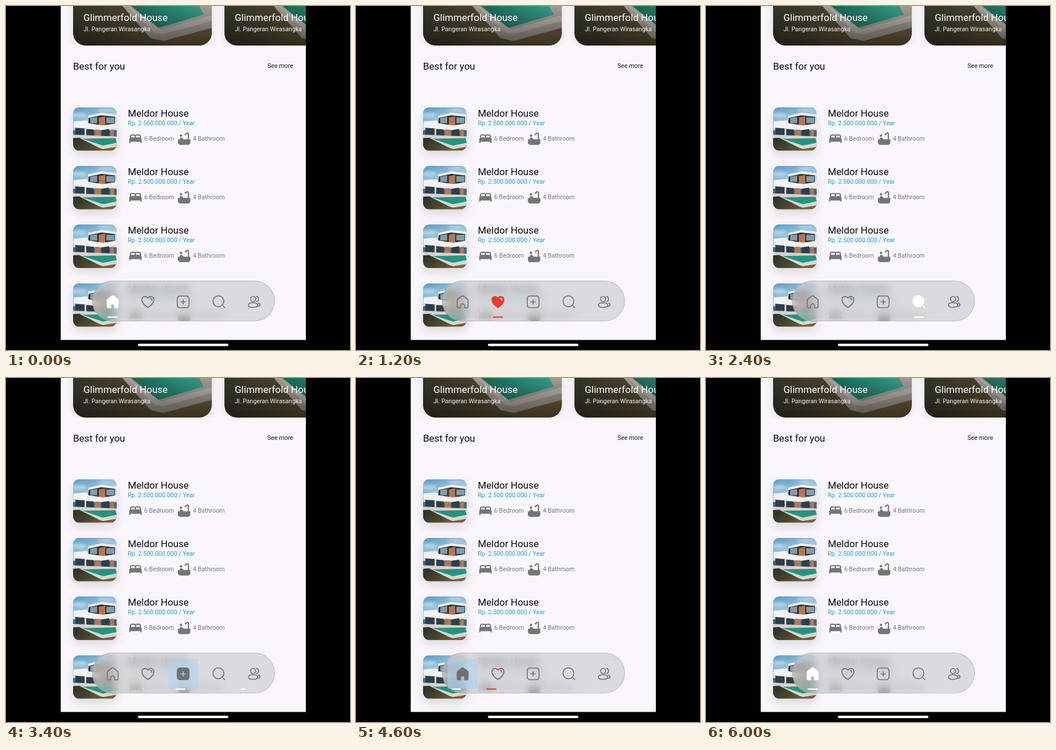
An HTML page that plays this animation: 600 px wide and 600 px high, repeating every 6.1 s.

```html
<!DOCTYPE html>
<html lang="en">
<head>
<meta charset="utf-8">
<style>
  html, body { margin: 0; width: 100%; height: 100%; overflow: hidden; background: #000; }
  svg { position: absolute; left: 0; top: 0; width: 600px; height: 600px; }
  text { font-family: Roboto, sans-serif; font-size: 10.65px; }
  .title { font-size: 17px; fill: #0b0b0d; }
  .price { fill: #2499e3; }
  .spec { fill: #757575; }
  .nav {
    position: absolute; left: 150px; top: 479px; width: 319px; height: 71px;
    box-sizing: border-box; border: 1px solid rgba(150, 150, 150, .45); border-radius: 36px;
    background: rgba(192, 192, 192, .52);
    -webkit-backdrop-filter: blur(8px); backdrop-filter: blur(8px);
  }
</style>
</head>
<body>
<svg viewBox="0 0 600 600">
  <defs>
    <linearGradient id="sky" x2=".3" y2="1">
      <stop stop-color="#5a9cc6"/><stop offset=".3" stop-color="#8dbdd9"/><stop offset=".6" stop-color="#d3e5ee"/>
    </linearGradient>
    <linearGradient id="grass" x2="1" y2=".4">
      <stop stop-color="#263024"/><stop offset=".5" stop-color="#484430"/><stop offset="1" stop-color="#75623f"/>
    </linearGradient>
    <linearGradient id="water" x2="1"><stop stop-color="#1c6a5b"/><stop offset="1" stop-color="#3ba58f"/></linearGradient>
    <linearGradient id="shade" x2="0" y2="1"><stop stop-color="#000" stop-opacity=".05"/><stop offset="1" stop-color="#000" stop-opacity=".5"/></linearGradient>
    <filter id="soft" x="-50%" y="-50%" width="200%" height="200%"><feGaussianBlur stdDeviation="9"/></filter>
    <filter id="haze" x="-50%" y="-50%" width="200%" height="200%"><feGaussianBlur stdDeviation="2.5"/></filter>
    <clipPath id="screen"><rect x="95.5" width="427.5" height="582.5"/></clipPath>
    <clipPath id="strip"><rect x="95.5" width="427.5" height="69"/></clipPath>
    <clipPath id="cardShape"><rect y="-100" width="242" height="169" rx="22"/></clipPath>
    <clipPath id="thumbShape"><rect width="76" height="76" rx="11"/></clipPath>
    <g id="house">
      <path fill="url(#sky)" d="M0 0H76V76H0Z"/>
      <g fill="#dfe9ee" opacity=".6" filter="url(#haze)"><ellipse cx="10" cy="14" rx="14" ry="4"/><ellipse cx="56" cy="5" rx="14" ry="2.5"/></g>
      <path fill="#47687a" d="M0 40H76V52H0Z"/>
      <path fill="#37322f" d="M28 15 47 10 73 15V31H26Z"/>
      <path fill="#7f9eae" d="M30 19 42 17V28H30ZM58 18H72V28H58Z"/>
      <path fill="#b47756" d="M45 18 56 16V32H45ZM38 39H48V53H38ZM65 39H71V51H65Z"/>
      <path fill="#f3f1f1" d="M26 15 49 9.500 76 13V17L49 14 26 19ZM1 25 24 23 27 28 53 32 76 28V36L53 40 1 35Z"/>
      <path fill="#2d3e48" d="M4 36 20 37V48H4ZM23 38 36 39V50H23ZM50 40 63 38V51H50Z"/>
      <path fill="#d8d2ce" d="M20 37H23V51H20ZM0 48 76 51V60H0Z"/>
      <path fill="url(#grass)" d="M0 54 14 53 76 64V76H0Z"/>
      <path fill="#ddd5cf" d="M10 53 76 52V69L52 73 46 71Z"/>
      <path fill="#23947f" d="M16 55 74 54 76 62 52 67Z"/>
    </g>
    <g id="garden">
      <path fill="url(#grass)" d="M0-100H242V69H0Z"/>
      <path fill="#aaa39b" d="M86 0 135 56 158 61 242 38V0Z"/>
      <path fill="#c2bab1" d="M95 0 143 47 157 49 242 26V16L154 41Z"/>
      <path fill="url(#water)" d="M101 0 149 38 228 15 220 0Z"/>
      <path fill="url(#shade)" d="M0 0H242V69H0Z"/>
    </g>
    <path id="bed" d="M21 10.780V8c0-1.650-1.350-3-3-3h-4c-.77 0-1.470.3-2 .78-.53-.48-1.230-.78-2-.78H6C4.350 5 3 6.350 3 8v2.780c-.61.55-1 1.340-1 2.220v6h2v-2h16v2h2v-6c0-.88-.39-1.670-1-2.220zM14 7h4c.55 0 1 .45 1 1v2h-6V8c0-.55.45-1 1-1zM5 8c0-.55.45-1 1-1h4c.55 0 1 .45 1 1v2H5V8z"/>
    <g id="bath"><circle cx="7" cy="7" r="2"/><path d="M20 13V4.800A2.800 2.800 0 0 0 15.200 2.800L13.900 4.100Q13 3.800 12.300 4.300L15.100 7.100Q15.600 6.400 15.300 5.500L16.600 4.200Q18 3.500 18 4.800V13H11.200L9 10.700Q8 10 7.300 10 5 10 5 12.300V13H2V19Q2 21 4 21 4 22 5 22H19Q20 22 20 21 22 21 22 19V13Z"/></g>
  </defs>
  <g clip-path="url(#screen)">
    <path fill="#f9f7fc" d="M95 0H523V583H95Z"/>
    <g id="cards" clip-path="url(#strip)"></g>
    <text class="title" x="117" y="111">Best for you</text>
    <text x="456" y="108" fill="#1b1b1d">See more</text>
    <g id="rows"></g>
  </g>
  <rect x="230" y="589" width="158" height="4.200" rx="2.100" fill="#fff"/>
</svg>
<div class="nav"></div>
<svg viewBox="0 0 600 600" id="tabs"></svg>

<script>
const $ = id => document.getElementById(id);

$('cards').innerHTML = [117, 381].map(x => `
  <rect x="${x}" y="-80" width="242" height="150" rx="22" opacity=".1" filter="url(#soft)"/>
  <g transform="translate(${x})">
    <use href="#garden" clip-path="url(#cardShape)"/>
    <text x="18" y="25.500" style="font-size:17px" fill="#fff">Glimmerfold House</text>
    <text x="18" y="44" fill="#f0f0f0">Jl. Pangeran Wirasangka</text>
  </g>`).join('');

$('rows').innerHTML = [0, 1, 2, 3].map(i => `
  <g transform="translate(117 ${176.5 + i * 102.3})">
    <rect y="8" width="76" height="76" rx="11" opacity=".12" filter="url(#soft)"/>
    <use href="#house" clip-path="url(#thumbShape)"/>
    <text class="title" x="95.500" y="16">Meldor House</text>
    <text class="price" x="95.500" y="31.300">Rp. 2.500.000.000 / Year</text>
    <g class="spec">
      <use href="#bed" transform="translate(95.800 42) scale(1.080)"/>
      <text x="124" y="58.300">6 Bedroom</text>
      <use href="#bath" transform="translate(180.700 42) scale(1.080)"/>
      <text x="209" y="58.300">4 Bathroom</text>
    </g>
  </g>`).join('');

// Each tab: centre x, active colour, fillable outline, extra strokes
const GREY = [112, 112, 112], WHITE = [255, 255, 255], RED = [240, 58, 44];
const tabs = [
  [186, WHITE, 'M-9.500-2Q-9.500-4-8-5L-1.500-10Q0-11 1.500-10L8-5Q9.500-4 9.500-2V8Q9.500 10.500 7 10.500H3.500V7A3.500 3.500 0 0 0-3.500 7V10.500H-7Q-9.500 10.500-9.500 8Z', ''],
  [247.5, RED, 'M0 10C-7 5-10.500 1.500-10.500-3.500-10.500-9.500-3.500-11.500 0-6.500 3.500-11.500 10.500-9.500 10.500-3.500 10.500 1.500 7 5 0 10Z', 'M4-6Q7-6 7-2.500'],
  [309, WHITE, 'M-5-10.300H5Q10.300-10.300 10.300-5V5Q10.300 10.300 5 10.300H-5Q-10.300 10.300-10.300 5V-5Q-10.300-10.300-5-10.300Z', 'M-4 0H4M0-4V4'],
  [371, WHITE, 'M-10-1A9.500 9.500 0 1 1 9-1 9.500 9.500 0 1 1-10-1Z', 'M7.500 7 10.500 10.200'],
  [433, WHITE, 'M-6.500-5A4.500 4.500 0 1 1 2.500-5 4.500 4.500 0 1 1-6.500-5ZM-10 5.500Q-10 1.500-2 1.500T6 5.500-2 9.700-10 5.500Z', 'M4-9.500A4.500 4.500 0 0 1 4-.7M7 2Q10 3 10 5T7 8']
].map(([x, color, shape, detail], i) => {
  $('tabs').insertAdjacentHTML('beforeend', `
    <g transform="translate(${x} 516)" fill="none" stroke-width="1.600" stroke-linecap="round" stroke-linejoin="round">
      <rect x="-26" y="-26" width="52" height="52" rx="3" fill="#a9d4f5"/>
      <path d="${shape}"/><path d="${detail}"/>
      <rect y="25.500" height="2.200" rx="1"/>
    </g>`);
  const [glow, icon, extra, bar] = $('tabs').lastElementChild.children;
  return { color, glow, icon, extra, bar, detailOnFill: i === 1 || i === 2 };
});

const LOOP = 6100, FIRST_TAP = 730, TAP_GAP = 630;
const order = [0, 1, 2, 3, 4, 2, 1, 0];
const clamp = v => Math.max(0, Math.min(1, v));
const rgb = (a, b, k) => `rgb(${a.map((v, i) => Math.round(v + (b[i] - v) * k))})`;

function drawTab(tab, active, leaving, age) {
  const slide = clamp(age / 200);
  const tint = active ? clamp((age - 150) / 130) : leaving ? clamp(1 - age / 150) : 0;
  const color = rgb(GREY, tab.color, tint);
  const { glow, icon, extra, bar } = tab;
  icon.setAttribute('stroke', color);
  icon.setAttribute('fill', active ? color : 'none');
  extra.setAttribute('stroke', active && tab.detailOnFill ? rgb([190, 200, 208], tab.color === RED ? WHITE : GREY, tint) : color);
  glow.setAttribute('opacity', active ? .5 * clamp(age / 60) * clamp((330 - age) / 160) : 0);

  const width = active ? 14.5 + 3.5 * slide : leaving ? 18 * Math.min(1, (1 - slide) * 1.78) : 0;
  const center = active ? -20 * (1 - slide) : -25 * slide;
  bar.setAttribute('x', center - width / 2);
  bar.setAttribute('width', width);
  bar.setAttribute('fill', rgb(tab.color, tab.color, 0));
}

const start = performance.now();
function frame() {
  const t = (performance.now() - start) % LOOP;
  const step = Math.max(0, Math.min(order.length - 1, Math.floor((t - FIRST_TAP) / TAP_GAP) + 1));
  const age = step ? t - FIRST_TAP - (step - 1) * TAP_GAP : LOOP;
  tabs.forEach((tab, i) => drawTab(tab, order[step] === i, order[step - 1] === i, age));
  requestAnimationFrame(frame);
}
frame();
</script>
</body>
</html>
```
